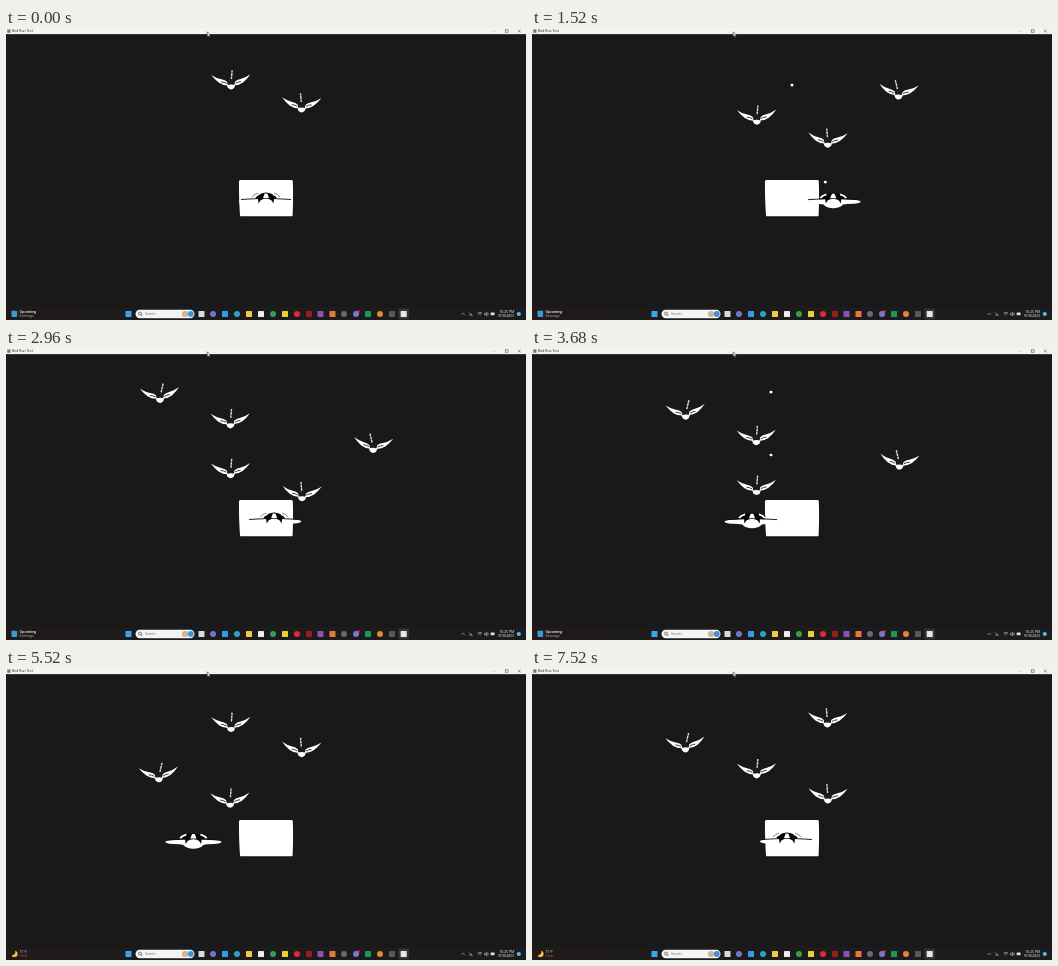
Write an HTML page that moves like this. It is 520 px wide and 292 px high and loops after 7600 ms.

```html
<!DOCTYPE html>
<html lang="en">
<head>
<meta charset="utf-8">
<title>Bird game</title>
<style>
html, body { margin: 0; width: 520px; height: 292px; overflow: hidden; background: #191919; }
svg { display: block; }
text { font-family: "Open Sans", "Noto Sans", sans-serif; font-size: 3.4px; }
</style>
</head>
<body>
<svg id="stage" width="520" height="292" viewBox="0 0 520 292">
  <defs>
    <linearGradient id="barFill">
      <stop offset="0" stop-color="#211a19"/>
      <stop offset=".25" stop-color="#1c1b1c"/>
      <stop offset="1" stop-color="#1b1c1e"/>
    </linearGradient>
    <g id="wing">
      <path fill="#fff" d="M-19.6 -11.4 Q-14 -7.6 -9.5 -6.8 Q-6 -6.2 -3.6 -4 L-3 -.6 Q-8 -.6 -12 -3.4 Q-16.4 -6.8 -19.6 -11.4Z"/>
      <path fill="none" stroke="#2a2a2a" stroke-width=".9" d="M-10 -4.3 Q-7 -4.2 -4.4 -2.6"/>
    </g>
    <g id="birdBody">
      <use href="#wing"/>
      <use href="#wing" transform="scale(-1 1)"/>
      <ellipse cy="-3.7" rx="3.7" ry="3.3" fill="#1c1c1c"/>
      <path fill="#fff" d="M-4.2 -.8 Q0 -2.2 4.2 -.8 L3.2 1.8 Q1.6 3.6 0 3.6 Q-1.6 3.6 -3.2 1.8Z"/>
    </g>
    <g id="shipHalf">
      <path fill="#fff" d="M-27.2 .5 Q-26.5 -1 -20 -1.4 L-7 -2.2 H.3 V7.2 Q-6.6 7.2 -9.6 3.4 Q-13 2.8 -20 2.6 Q-26.5 2 -27.2 .5Z"/>
      <path fill="none" stroke="#080808" stroke-width=".9" d="M-25 -1.5 Q-17 -2 -8 -2.4"/>
      <path fill="#080808" d="M.3 -8.4 Q-7 -8.2 -10.8 -3 L-8 -2 L-7.4 2.4 L-5.6 -.6 Q-3 -2.4 .3 -2.4Z"/>
      <path fill="none" stroke="#fff" stroke-width="1.8" d="M-12.8 -3.2 Q-11 -6 -6.8 -6.8"/>
      <path fill="none" stroke="#080808" stroke-width=".5" d="M-14 -4 Q-11 -7.4 -8 -7.8"/>
    </g>
  </defs>

  <rect width="520" height="292" fill="#191919"/>
  <path fill="#fff" d="M233 152.9 Q233.2 152 235 152 H285 Q286.6 152 286.8 153 Q287.4 170 286.6 187.4 Q286.4 188.3 285 188.3 H236 Q234.2 188.4 234 187.4 Q232.7 170 233 152.9Z"/>
  <g id="birds"></g>
  <g id="bullets" fill="#fff"></g>
  <g id="ship">
    <use href="#shipHalf"/>
    <use href="#shipHalf" transform="scale(-1 1)"/>
    <path fill="#fff" d="M-3 -3 L-1.3 -7.4 H1.3 L3 -3Z"/>
  </g>

  <g id="titleBar">
    <rect width="520" height="6.15" fill="#f5f2f0"/>
    <rect x="1.2" y="1.4" width="3.2" height="3.4" fill="#777"/>
    <text x="6" y="4.4" fill="#222">Bird Run Test</text>
    <g fill="none" stroke="#333" stroke-width=".5">
      <path stroke="#aaa" d="M487 3.2h2.6"/>
      <path d="M512 1.8l2.6 2.6 M514.6 1.8l-2.6 2.6"/>
      <rect x="499.6" y="1.8" width="2.4" height="2.4"/>
    </g>
    <path fill="#fff" stroke="#222" stroke-width=".5" d="M201.3 3.8 V8.6 L202.4 7.7 L203.2 9.2 L203.9 8.8 L203.2 7.4 H204.5Z"/>
  </g>

  <g id="taskbar">
    <rect y="279" width="520" height="13" fill="url(#barFill)"/>
    <g id="news">
      <rect x="5.5" y="282.8" width="5.6" height="6.2" rx=".8" fill="#3a9bdc"/>
      <text x="13.6" y="285.2" fill="#fff" font-weight="600">Upcoming</text>
      <text x="13.6" y="289.2" fill="#bbb">Evenings</text>
    </g>
    <g id="weather">
      <path fill="#f4bd45" d="M9 282.8 A3.2 3.2 0 1 1 5.4 287 A3 3 0 0 0 9 282.8Z"/>
      <text x="13.6" y="285.2" fill="#ddd">71°F</text>
      <text x="13.6" y="289.2" fill="#b46a5c">Clear</text>
    </g>
    <rect x="129.5" y="281.8" width="59" height="8.4" rx="4.2" fill="#f4f4f4"/>
    <g fill="none" stroke="#333" stroke-width=".6">
      <circle cx="134" cy="285.6" r="1.5"/>
      <path d="M135.1 286.7l1.3 1.3"/>
    </g>
    <text x="139" y="287.2" fill="#666">Search</text>
    <ellipse cx="179" cy="286" rx="3.2" ry="3" fill="#cbb694"/>
    <circle cx="184.8" cy="286" r="2.9" fill="#3b93d8"/>
    <rect x="392.5" y="280.7" width="10.5" height="10.5" rx="1.4" fill="#343537"/>
    <g id="icons"></g>
    <g fill="none" stroke="#ddd" stroke-width=".6">
      <path d="M455.8 286.6l1.4 -1.4l1.4 1.4 M463.5 284.6l3 3 M463.5 287h2.4"/>
      <path d="M471.6 285.2q2.2 -2 4.4 0 M472.6 286.5q1.2 -1 2.4 0"/>
      <path d="M478.6 285.3h1l1.2 -1v3.6l-1.2 -1h-1z M482 285v2"/>
    </g>
    <rect x="484.6" y="284.6" width="4" height="2.6" rx=".5" fill="#ddd"/>
    <g fill="#fff" text-anchor="end">
      <text x="508" y="285.2">10:25 PM</text>
      <text x="508" y="289.2">9/18/2023</text>
    </g>
    <circle cx="512.8" cy="286" r="2.1" fill="#55b9ee"/>
  </g>
</svg>
<script>
const LOOP = 7600, STEP = 80;
const FALL = 0.0232, RISE = 0.26;
const BIRD_END = 150, BULLET_TOP = 33, MUZZLE = 165;

// column, birth time, height at birth
const birdTable = [
  [225, 0, 58], [295.5, 0, 81], [366.5, 530, 45], [224.5, 1600, 45.3],
  [153.7, 2640, 43.9], [295.5, 4000, 50.3], [225, 4880, 45.6],
  [153.7, 5920, 43.7], [295.5, 6960, 43]
];
// column, firing time
const bulletTable = [
  [260, 1105], [293.3, 1478], [297.5, 1978], [298, 2258],
  [239, 3215], [239, 3457], [137, 4562], [254.5, 5978]
];
// time, ship centre
const shipPath = [
  [0, 260], [1030, 260], [1600, 308], [1720, 299], [2600, 299], [3300, 239],
  [3440, 239], [3680, 220], [4720, 131], [4800, 125], [6300, 255], [LOOP, 255]
];
// centre, colour, shape
const iconTable = [
  [122.5, "#35a8ee", "s"], [195.5, "#d5dae0", "s"], [207, "#7775c9", "c"],
  [219, "#2f9de8", "s"], [231, "#26a5c7", "c"], [243, "#f3c750", "s"],
  [255, "#ececec", "s"], [267, "#36a346", "c"], [279, "#e3d337", "s"],
  [291, "#e5253a", "c"], [303, "#9c1823", "s"], [314.5, "#8b50b5", "s"],
  [326.5, "#e57735", "s"], [338, "#6b6c70", "c"], [350, "#7078d8", "c"],
  [362, "#1f9655", "s"], [374, "#e18a31", "c"], [386, "#55585c", "s"],
  [397.7, "#e8e8e8", "s"]
];

const $ = id => document.getElementById(id);
function add(parent, tag, attrs) {
  const el = document.createElementNS("http://www.w3.org/2000/svg", tag);
  for (const key in attrs) el.setAttribute(key, attrs[key]);
  return parent.appendChild(el);
}
const show = (el, on) => el.setAttribute("visibility", on ? "visible" : "hidden");
const place = (el, x, y, extra = "") =>
  el.setAttribute("transform", `translate(${x.toFixed(2)} ${y.toFixed(2)}) ${extra}`);

for (const [x, fill, shape] of iconTable) {
  if (shape === "c") add($("icons"), "circle", { cx: x, cy: 286, r: 3, fill });
  else add($("icons"), "rect", { x: x - 3, y: 283, width: 6, height: 6, rx: 0.6, fill });
}
add($("icons"), "circle", { cx: 352.3, cy: 283.7, r: 1.3, fill: "#e04444" });

const birds = birdTable.map(([col, born, top]) => {
  const el = add($("birds"), "g", {});
  const lean = (260 - col) * 0.03;
  add(el, "path", {
    d: `M${lean * 0.3} -6.5 L${lean} -15.8`, stroke: "#ddd",
    "stroke-width": 1.4, "stroke-dasharray": "3 .5"
  });
  add(el, "use", { href: "#birdBody", transform: `rotate(${-lean * 0.8})` });
  return { el, col, born, top };
});
const bullets = bulletTable.map(([x, fired]) => ({
  el: add($("bullets"), "ellipse", { rx: 1.6, ry: 1.3 }), x, fired
}));

function along(path, t) {
  const i = Math.max(1, path.findIndex(p => p[0] >= t));
  const [t0, a] = path[i - 1], [t1, b] = path[i];
  return a + (b - a) * (t - t0) / (t1 - t0);
}

function draw(t) {
  for (const { el, col, born, top } of birds) {
    const y = top + FALL * (t - born);
    show(el, t >= born && y < BIRD_END);
    place(el, col + (col - 260) * (y - 68) * 0.00018, y);
  }
  for (const { el, x, fired } of bullets) {
    const y = MUZZLE - RISE * (t - fired);
    show(el, t >= fired && y > BULLET_TOP);
    place(el, x, y);
  }
  const x = along(shipPath, t);
  const off = (x - 260) / 129;
  place($("ship"), x, 173 + off * off * 1.6, `scale(${1 + off * off * 0.11} 1)`);
  show($("news"), t < 5200);
  show($("weather"), t >= 5200);
}

const start = performance.now();
function tick() {
  const t = (performance.now() - start) % LOOP;
  draw(Math.floor(t / STEP) * STEP);
  requestAnimationFrame(tick);
}
tick();
</script>
</body>
</html>
```
